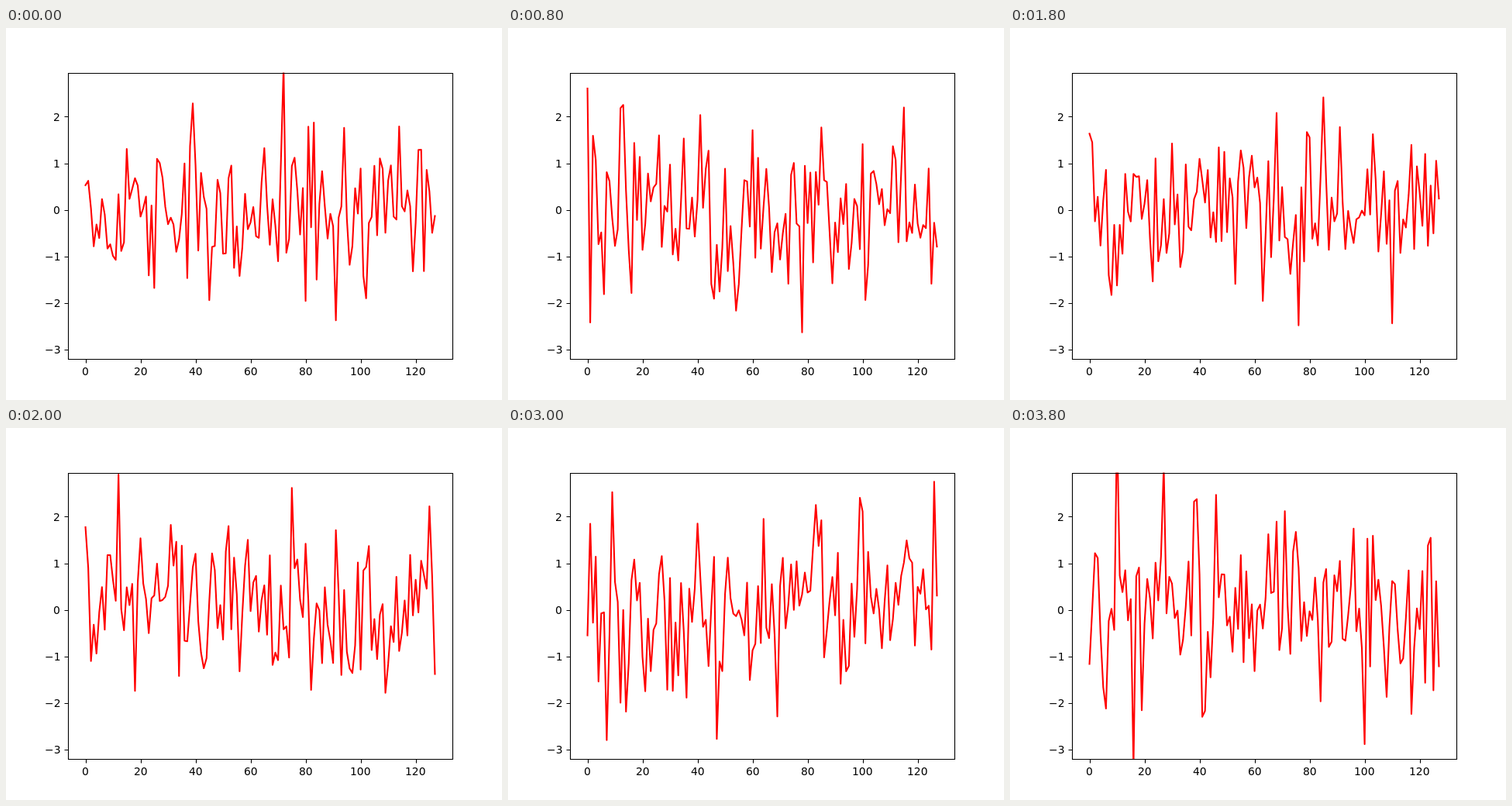
An HTML page that plays this animation: 640x480 px, repeating every 4 s.

```html
<!DOCTYPE html>
<html>
<head>
<meta charset="utf-8">
<style>
  html, body { margin: 0; width: 100%; height: 100%; overflow: hidden; background: #fff; }
  svg { display: block; font: 13.89px "DejaVu Sans", sans-serif; }
</style>
</head>
<body>
<svg width="640" height="480" viewBox="0 0 640 480">
  <clipPath id="area"><rect x="80" y="57.6" width="496" height="369.6"/></clipPath>
  <path id="line" clip-path="url(#area)" fill="none" stroke="#f00" stroke-width="2.083"
        stroke-linejoin="round" stroke-linecap="square"/>
  <path id="axes" fill="none" stroke="#000" stroke-width="1.11"/>
  <g id="labels"></g>
</svg>
<script>
const COUNT = 128, STEP = 200, LOOP = 4000;
const px = i => 102.545 + i * 450.909 / 127;
const py = v => 234.7 - v * 60.15;
const snap = p => Math.round(p) + 0.5;
const byId = id => document.getElementById(id);

function randomizer(seed) {
  return () => {
    seed = seed + 0x6D2B79F5 | 0;
    let t = Math.imul(seed ^ seed >>> 15, 1 | seed);
    t = t + Math.imul(t ^ t >>> 7, 61 | t) ^ t;
    return ((t ^ t >>> 14) >>> 0) / 4294967296;
  };
}

// Standard normal sample (Box-Muller)
function gaussian(random) {
  const radius = Math.sqrt(-2 * Math.log(1 - random()));
  return radius * Math.cos(2 * Math.PI * random());
}

// Each step shows a fresh run of white noise
function trace(step) {
  const random = randomizer(step * 7919 + 17);
  const points = Array.from({ length: COUNT }, (_, i) =>
    px(i).toFixed(2) + " " + py(gaussian(random)).toFixed(2));
  return "M" + points.join("L");
}

// Places text on whole pixels; share is the part of its width left of x
function label(value, x, y, share) {
  const text = document.createElementNS("http://www.w3.org/2000/svg", "text");
  text.textContent = String(value).replace("-", "\u2212");
  byId("labels").append(text);
  text.setAttribute("x", Math.round(x - share * text.getComputedTextLength()));
  text.setAttribute("y", Math.round(y));
}

let axes = "M80.5 58.5H576.5V427.5H80.5Z";
for (let n = 0; n <= 120; n += 20) {
  axes += `M${snap(px(n))} 427.5v5`;
  label(n, px(n), 448, 0.5);
}
for (let n = -3; n <= 2; n++) {
  axes += `M80.5 ${snap(py(n))}h-5`;
  label(n, 70.3, py(n) + 5.2, 1);
}
byId("axes").setAttribute("d", axes);

const traces = Array.from({ length: LOOP / STEP }, (_, step) => trace(step));
let shown = -1;
function draw() {
  const step = Math.floor(performance.now() % LOOP / STEP);
  if (step !== shown) byId("line").setAttribute("d", traces[shown = step]);
  requestAnimationFrame(draw);
}
draw();
</script>
</body>
</html>
```
